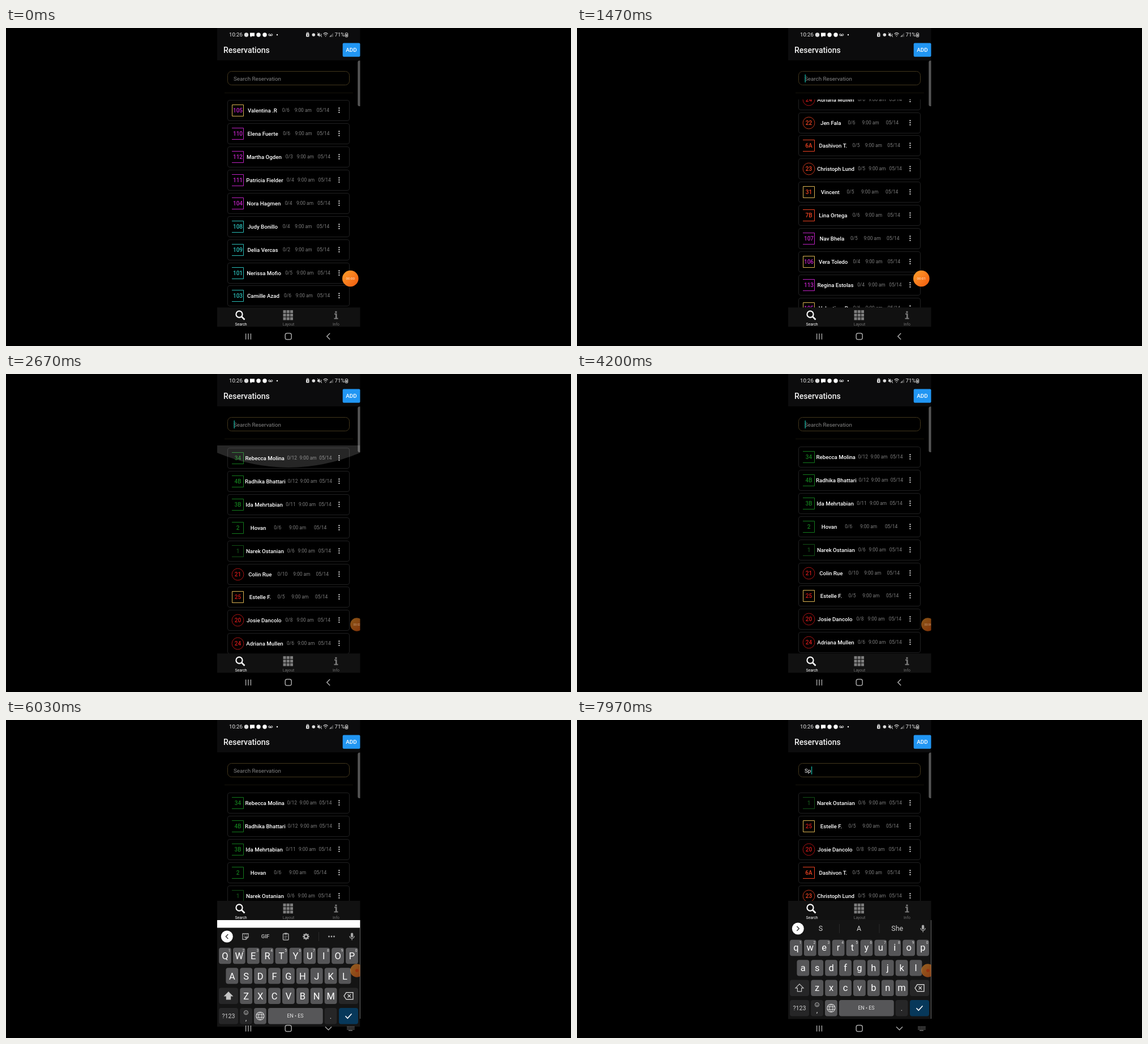
An HTML page with a canvas for the animation above (8 s loop, 998x561 px).

```html
<!DOCTYPE html>
<html lang="en">
<head>
<meta charset="utf-8">
<title>Reservations</title>
<style>
  html, body { margin: 0; height: 100%; overflow: hidden; background: #000; }
  canvas { display: block; width: 998px; height: 561px; }
</style>
</head>
<body>
<canvas width="998" height="561"></canvas>
<script>
const ctx = document.querySelector('canvas').getContext('2d');
const LOOP = 8000, LEFT = 373, RIGHT = 625.5, WIDTH = RIGHT - LEFT;
const ROW_TOP = 146.6, ROW_PITCH = 40.88;
const GREEN = '#137a1c', RED = '#d31a1a', ORANGE = '#ee4322', MAGENTA = '#c022c4', CYAN = '#2bbdb8', GOLD = '#dcb452';

// label, guest name, party size, colour, shape (o = circle, g = gold frame)
const guests = [
  ['34', 'Rebecca Molina', 12, GREEN], ['4B', 'Radhika Bhattari', 12, GREEN],
  ['3B', 'Ida Mehrtabian', 11, GREEN], ['2', 'Hovan', 6, GREEN],
  ['1', 'Narek Ostanian', 6, '#125016'], ['21', 'Colin Rue', 10, RED, 'o'],
  ['25', 'Estelle F.', 5, RED, 'g'], ['20', 'Josie Dancolo', 8, RED, 'o'],
  ['24', 'Adriana Mullen', 6, RED, 'o'], ['22', 'Jen Fala', 6, ORANGE, 'o'],
  ['6A', 'Dashivon T.', 5, ORANGE], ['23', 'Christoph Lund', 5, ORANGE, 'o'],
  ['31', 'Vincent', 5, ORANGE, 'g'], ['7B', 'Lina Ortega', 6, ORANGE],
  ['107', 'Nav Bhela', 5, MAGENTA], ['106', 'Vera Toledo', 4, MAGENTA, 'g'],
  ['113', 'Regina Estolas', 4, MAGENTA], ['105', 'Valentina .R', 6, MAGENTA, 'g'],
  ['110', 'Elena Fuerte', 6, MAGENTA], ['112', 'Martha Ogden', 3, MAGENTA],
  ['111', 'Patricia Fielder', 4, MAGENTA], ['104', 'Nora Hagmen', 4, MAGENTA],
  ['108', 'Judy Bonillo', 4, CYAN], ['109', 'Delia Vercas', 2, CYAN],
  ['101', 'Nerissa Mofio', 5, CYAN], ['103', 'Camille Azad', 6, CYAN]
];
const filtered = guests.filter(g => /s/i.test(g[1]));

const clamp = x => Math.max(0, Math.min(1, x));
const easeOut = x => 1 - (1 - x) ** 2;

// Eased value between [time, value] points.
function track(t, points, ease = easeOut) {
  let i = points.findIndex(p => p[0] > t);
  if (i < 0) return points[points.length - 1][1];
  if (i === 0) return points[0][1];
  const [t0, a] = points[i - 1], [t1, b] = points[i];
  return a + (b - a) * ease((t - t0) / (t1 - t0));
}

function setFont(size, weight = 400, family = 'Roboto, sans-serif') {
  ctx.font = `${weight} ${size}px ${family}`;
}
function text(str, x, y, size, color = '#fff', align = 'center', weight, family) {
  setFont(size, weight, family);
  ctx.textAlign = align;
  ctx.fillStyle = color;
  ctx.fillText(str, x, y + size * 0.355);
}
function rect(x, y, w, h, color) {
  ctx.fillStyle = color;
  ctx.fillRect(x, y, w, h);
}
function rounded(x, y, w, h, r, fill, stroke, lineWidth = 1) {
  ctx.beginPath();
  ctx.roundRect(x, y, w, h, r);
  paint(fill, stroke, lineWidth);
}
function circle(x, y, r, fill, stroke, lineWidth = 1) {
  ctx.beginPath();
  ctx.arc(x, y, r, 0, 7);
  paint(fill, stroke, lineWidth);
}
function paint(fill, stroke, lineWidth) {
  if (fill) { ctx.fillStyle = fill; ctx.fill(); }
  if (stroke) { ctx.strokeStyle = stroke; ctx.lineWidth = lineWidth; ctx.stroke(); }
}
function path(d, x, y, fill, stroke, lineWidth = 1) {
  ctx.save();
  ctx.translate(x, y);
  const p = new Path2D(d);
  if (fill) { ctx.fillStyle = fill; ctx.fill(p); }
  if (stroke) { ctx.strokeStyle = stroke; ctx.lineWidth = lineWidth; ctx.stroke(p); }
  ctx.restore();
}
function clipped(x, y, w, h, draw) {
  ctx.save();
  ctx.beginPath();
  ctx.rect(x, y, w, h);
  ctx.clip();
  draw();
  ctx.restore();
}

function drawStatusBar() {
  text('10:26', 394, 12, 9.6, '#e8e8e8', 'left');
  circle(424.5, 12, 3.7, '#ddd');
  path('M-4-3H4V3H-1L-3 5V3H-4Z', 435, 11.5, '#fff');
  circle(446, 12, 3.7, '#fff');
  circle(457, 12, 3.7, '#fff');
  circle(465.2, 12, 1.5, null, '#ddd');
  circle(469.3, 12, 1.5, null, '#ddd');
  path('M-2 1.6H2', 467.2, 12, null, '#ddd');
  circle(479, 12, 1.2, '#fff');
  rounded(530, 9.5, 5.5, 6, 1, '#ddd');
  path('M-1.5-2V-4H1.5V-2', 532.8, 12, null, '#ddd');
  rect(532, 11.5, 1.6, 2, '#111');
  circle(543.3, 12, 2.8, '#ddd');
  path('M-4-1.5H-2L0-4V4L-2 1.5H-4Z', 554, 12, '#ddd');
  path('M-4-4L4 4M2-2Q4 0 2 2', 554, 12, null, '#ddd');
  path('M-4-1.5Q0-5.5 4-1.5M-2.3.6Q0-1.8 2.3.6M-.8 2.6H.8', 564.5, 12, null, '#bbb', 1.2);
  path('M-3.5 3.5H3.5V-3.5Z', 574.5, 12, '#444');
  path('M-3.5 3.5H0V0Z', 574.5, 12, '#999');
  text('71%', 580.5, 12, 9.6, '#e8e8e8', 'left');
  rounded(599.3, 8.8, 4.4, 7, 1, null, '#ddd');
  rect(600.5, 11, 2, 3.5, '#ddd');
}

function drawHeader(query, cursorOn) {
  rect(LEFT, 0, WIDTH, 57, '#0c0c0d');
  drawStatusBar();
  text('Reservations', 384, 39.3, 14, '#f2f2f2', 'left', 500);
  rounded(594.7, 26.5, 30.8, 24.3, 2, '#2196f3');
  text('ADD', 610, 39, 9.8, '#fff', 'center', 500);
  rounded(621.3, 57.5, 4.2, 80.5, [3, 0, 0, 3], '#555');
  rounded(391.5, 76.5, 215, 24, 7, null, '#42361c');
  text(query || 'Search Reservation', 402, 89.3, 9.8, query ? '#fff' : '#858585', 'left');
  if (cursorOn) rect(402.5 + (query ? ctx.measureText(query).width : 0), 82, 1.4, 14, '#12a898');
  rect(386, 114, 227, 1, '#15130a');
}

function drawBadge(label, y, color, shape) {
  if (shape === 'o') circle(409.5, y, 10.4, null, color, 0.8);
  else if (shape === 'g') rounded(399.5, y - 10, 20, 20, 0, null, GOLD);
  else path('M-10.5-10H10V10H-10.5', 409.5, y, null, color);
  text(label, 409.5, y, 10, color, 'center', 500);
}

function drawRow([label, name, size, color, shape], y) {
  rounded(391.5, y - 18, 215, 36, 3.5, null, '#202021');
  drawBadge(label, y, color, shape);

  // The four texts share the free width evenly.
  const cells = [name, '0/' + size, '9:00 am', '05/14'].map((str, i) => {
    const px = i ? 8.4 : 9.7, weight = i ? 400 : 500;
    setFont(px, weight);
    return { str, px, weight, color: i ? '#7c7c7c' : '#fff', width: ctx.measureText(str).width };
  });
  const gap = (162 - cells.reduce((sum, c) => sum + c.width, 0)) / 5;
  let x = 418 + gap;
  for (const c of cells) {
    text(c.str, x, y, c.px, c.color, 'left', c.weight);
    x += c.width + gap;
  }
  for (const dy of [-3.7, 0, 3.7]) circle(588.4, y + dy - 0.4, 1.15, '#e8e8e8');
}

function drawList(rows, scroll, bottom, glow) {
  clipped(LEFT, 126, WIDTH, bottom - 126, () => {
    rows.forEach((row, i) => {
      // Half-pixel centres keep the thin frames crisp.
      const y = Math.floor(ROW_TOP + i * ROW_PITCH - scroll) + 0.5;
      if (y > 100 && y < bottom + 25) drawRow(row, y);
    });
    if (glow > 0) {
      path(`M0 0V${13 * glow}Q${WIDTH / 2} ${65 * glow} ${WIDTH} ${13 * glow}V0Z`, LEFT, 126,
        `rgba(255,255,255,${0.15 * Math.min(1, glow)})`);
    }
  });
}

function drawTabs(y) {
  rect(LEFT, y, WIDTH, 34, '#111');
  circle(412, y + 12, 5.6, null, '#fff', 2.1);
  path('M0 0L5.5 5.5', 416, y + 16, null, '#fff', 2.7);
  for (let i = 0; i < 9; i++) rect(489.5 + i % 3 * 6.2, y + 4.8 + Math.floor(i / 3) * 6.2, 5.1, 5.1, '#7d7d7d');
  rect(581.4, y + 6.7, 3, 2.8, '#7d7d7d');
  path('M-3-3H1.5V5H3.5V7H-3.5V5H-1V-1H-3Z', 583, y + 13.5, '#7d7d7d');
  text('Search', 415, y + 29.7, 6.9);
  text('Layout', 499, y + 29.7, 6.9, '#707070');
  text('Info', 583, y + 29.7, 6.9, '#707070');
}

function drawNavigation(keyboardUp) {
  const c = '#a8a8a8';
  for (const x of [423.6, 428, 432.4]) rect(x - 0.7, 539, 1.4, 10.5, c);
  rounded(493.2, 538.5, 11, 11, 3.3, null, c, 1.5);
  path(keyboardUp ? 'M-5.5-2.7L0 2.7L5.5-2.7' : 'M2.7-5.5L-2.7 0L2.7 5.5', 569.5, 544, null, c, 1.5);
  if (keyboardUp) {
    for (let i = 0; i < 18; i++) rect(602.5 + i % 6 * 2.3, 540.5 + Math.floor(i / 6) * 2.3, 1.2, 1.2, c);
    rect(605, 547.3, 7, 1, c);
  }
}

function drawToolbar(y, suggestions) {
  circle(390.3, y, 10.5, '#fff');
  path(suggestions ? 'M-2-4L2 0L-2 4' : 'M2-4L-2 0L2 4', 390.3, y, null, '#333', 1.4);
  if (suggestions) {
    ['S', 'A', 'She'].forEach((word, i) => text(word, 430.5 + 67.6 * i, y, 12.4, '#d0d0d0'));
    rect(463, y - 8, 1, 16, '#2a2a2a');
    rect(533.5, y - 8, 1, 16, '#2a2a2a');
  } else {
    const c = '#aaa';
    path('M-5-5H5V1L1 5H-5ZM1 5V1H5M-2.5 0Q-.5 3 1 0M-2-2.5H-1M1.5-2.5H2.5', 423, y, null, c, 1.3);
    text('GIF', 458, y, 9.6, c, 'center', 700);
    rounded(489.5, y - 5, 9.5, 11, 1, null, c, 1.4);
    rect(492, y - 6.5, 4.5, 3, c);
    path('M-2.5-.5H2.5M-2.5 2.5H1.5', 494.2, y, null, c);
    for (let i = 0; i < 4; i++) {
      const a = i * Math.PI / 4, dx = 5.8 * Math.cos(a), dy = 5.8 * Math.sin(a);
      path(`M${-dx} ${-dy}L${dx} ${dy}`, 530, y, null, c, 2.4);
    }
    circle(530, y, 3.2, '#141414', c, 2.2);
    rect(552, y - 8, 1, 16, '#2a2a2a');
    for (const x of [570.5, 575, 579.5]) circle(x, y, 1.4, c);
  }
  rounded(609, y - 6.5, 4.2, 8, 2.1, '#aaa');
  path('M-4-1Q-4 3.2 0 3.2T4-1M0 3V6.5', 611.1, y, null, '#aaa', 1.2);
}

function drawKeyboard(offset, lower, suggestions) {
  const LIGHT = '#565658', DARK = '#262627';
  rect(LEFT, 352.5 + offset, WIDTH, 175, '#141414');
  drawToolbar(368 + offset, suggestions);
  const key = (x, y, w, color) => rounded(x - w / 2, y - 14.2, w, 28.4, 4, color);
  const rows = [['QWERTYUIOP', 386.9], ['ASDFGHJKL', 399.3], ['ZXCVBNM', 424.2]];
  rows.forEach(([letters, x0], r) => {
    const y = 402 + 35.4 * r + offset;
    [...letters].forEach((letter, i) => {
      const x = x0 + 24.9 * i;
      key(x, y, 21.8, LIGHT);
      text(lower ? letter.toLowerCase() : letter, x, y + (lower ? -0.6 : 0.3), 16.5);
      if (!r) text(String((i + 1) % 10), x + 7.6, y - 9, 6.6, '#ddd');
    });
  });

  const y3 = 472.8 + offset, y4 = 508.2 + offset;
  key(393, y3, 34, DARK);
  path('M0-7L7 0H3.6V6H-3.6V0H-7Z', 393, y3, lower ? null : '#c4c4c4', '#c4c4c4', 1.2);
  key(605, y3, 34, DARK);
  path('M-8 0L-4-6H8V6H-4ZM-1.5-2.7L4 2.7M4-2.7L-1.5 2.7', 605, y3, null, '#d0d0d0', 1.4);

  key(393, y4, 34, DARK);
  text('?123', 393, y4, 10.6, '#d0d0d0');
  key(424, y4, 21.8, DARK);
  circle(424, y4 - 6, 3.6, null, '#c4c4c4', 0.9);
  path('M-2 .5Q0 3 2 .5M-1.6-1H-.8M.8-1H1.6', 424, y4 - 6, null, '#c4c4c4', 0.8);
  text(',', 424, y4 + 3.2, 13, '#ddd');
  key(448.9, y4, 21.8, LIGHT);
  circle(448.9, y4, 7, null, '#ddd', 1.1);
  path('M-7-2.4H7M-7 2.4H7M0-7Q-6.5 0 0 7Q6.5 0 0-7', 448.9, y4, null, '#ddd', 1);
  key(511.3, y4, 96.8, LIGHT);
  text('EN • ES', 511, y4, 8.8, '#e4e4e4');
  key(573.5, y4, 21.8, DARK);
  text('.', 573.5, y4, 13, '#ddd');
  key(605, y4, 34, '#07385a');
  path('M-5.5 0L-1.7 4L5.5-4', 605, y4, null, '#fff', 1.6);
}

function drawRecorder(t) {
  const dock = easeOut(clamp((t - 1900) / 250));
  const x = 608.3 + 11.5 * dock, r = 14.3 - 2.6 * dock;
  clipped(LEFT, 400, WIDTH, 80, () => {
    ctx.globalAlpha = 1 - 0.46 * dock;
    const fill = ctx.createLinearGradient(x - r, 442 - r, x + r, 442 + r);
    fill.addColorStop(0, '#ffa02c');
    fill.addColorStop(1, '#f2590e');
    circle(x, 442, r, fill);
    if (t < 5000) text('00:0' + Math.floor(t / 1000), x, 442, 6.2 - 1.4 * dock, '#ffe9d6');
    else circle(x, 442, 2.8, '#9c1808');
    ctx.globalAlpha = 1;
  });
}

function render(t) {
  const typedS = t >= 6680, typedP = t >= 7930;
  const blinkOn = typedP || (typedS ? (t - 6680) % 1000 < 500 : t >= 335 && (t - 335) % 965 < 485);
  const scroll = track(t, [[30, 695.7], [430, 590], [600, 590], [1400, 349], [1470, 348], [2230, 143], [2270, 143], [2580, -2], [2800, -2], [3000, 0]]);
  const glow = track(t, [[2540, 0], [2660, 1], [2720, 1], [3000, 0], [3100, 0], [3250, 0.9], [3570, 0]], x => x);
  const raised = t >= 5850, keyboardUp = t >= 5650;
  const slide = track(t, [[5650, 175], [6000, 14], [6200, 14], [6330, 0]]);
  const tabTop = raised ? 319 : 493;

  rect(0, 0, 998, 561, '#000');
  drawHeader(typedP ? 'Sp' : typedS ? 'S' : '', blinkOn);
  drawList(t >= 6900 ? filtered : guests, t >= 6900 ? 0 : scroll, tabTop, glow);
  drawTabs(tabTop);
  if (raised) rect(LEFT, 353, WIDTH, 174, '#fff');
  if (keyboardUp) {
    clipped(LEFT, 300, WIDTH, 241, () => drawKeyboard(slide, typedS, t >= 7000));
  }
  drawNavigation(keyboardUp);
  drawRecorder(t);
}

function tick() {
  render(performance.now() % LOOP);
  requestAnimationFrame(tick);
}
tick();
</script>
</body>
</html>
```
